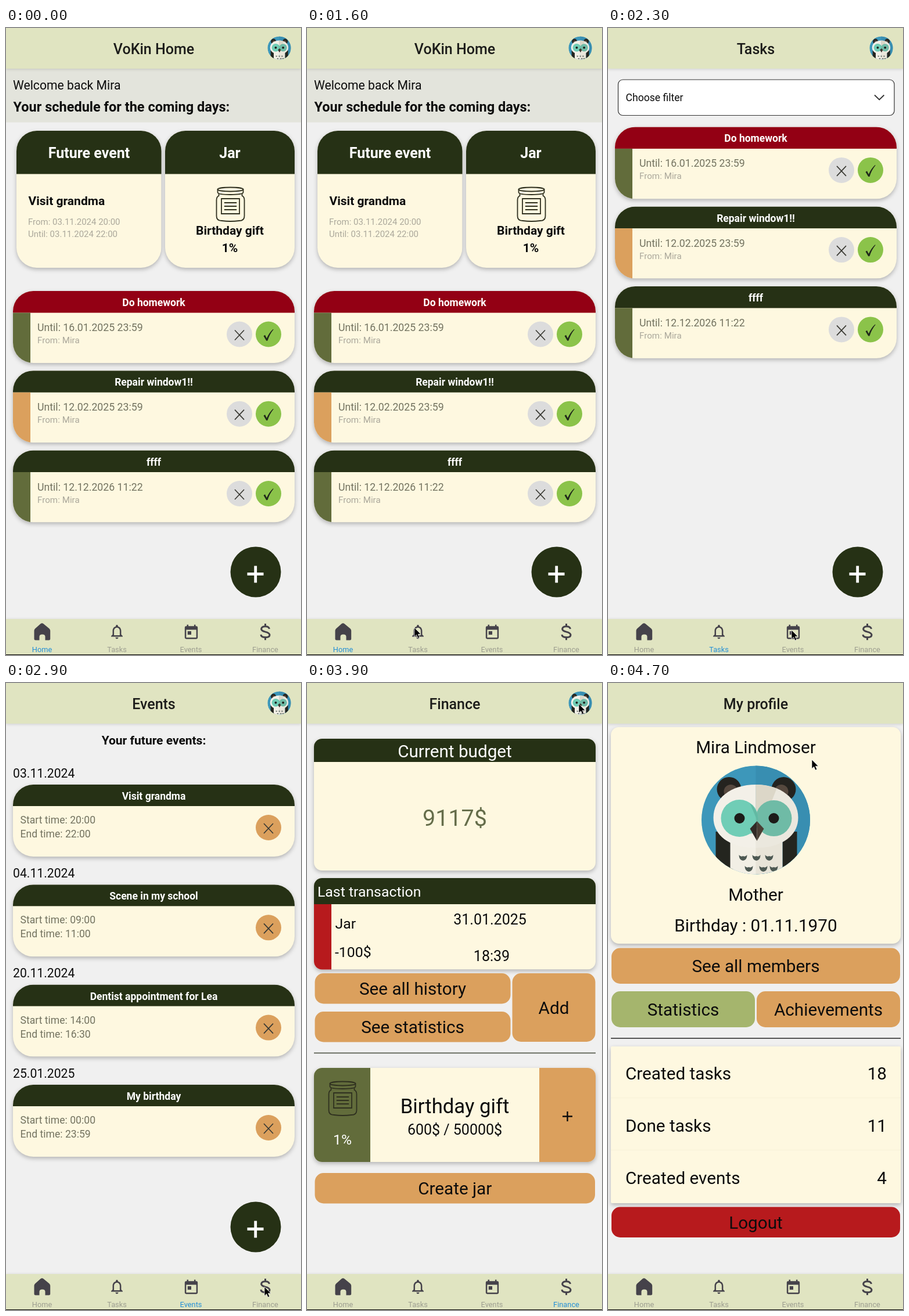
An HTML page that plays this animation: 508x1080 px, repeating every 5100 ms.

```html
<!DOCTYPE html>
<html lang="en">
<head>
<meta charset="utf-8">
<title>Family planner</title>
<style>
  html, body { margin: 0; width: 100%; height: 100%; overflow: hidden; background: #f0f0f0; }
  svg { display: block; width: 100vw; height: 100vh; }
  text { font-family: Roboto, Arial, sans-serif; white-space: pre; }
  .shadow { filter: drop-shadow(0 3px 3.5px rgba(0, 0, 0, .25)); }
  .soft { filter: drop-shadow(0 1px 2.5px rgba(0, 0, 0, .14)); }
</style>
</head>
<body>
<svg id="stage" viewBox="0 0 508 1080"></svg>
<script>
const C = {
  bar: '#e0e4c1', page: '#f0f0f0', dark: '#263115', cream: '#fef8e0', red: '#930014',
  olive: '#626c3b', orange: '#dba05d', green: '#8bc34a', grey: '#dcdcdc', moss: '#a5b56d',
  alert: '#b71a1d', body: '#737360', faint: '#aba89b', icon: '#45424a', blue: '#2490d6', ink: '#0c0c0c'
};
const USER = 'Mira', FULL_NAME = 'Mira Lindmoser';
let clipCount = 0;

const rect = (x, y, w, h, fill, r = 0, extra = '') =>
  `<rect x="${x}" y="${y}" width="${w}" height="${h}" rx="${r}" fill="${fill}" ${extra}/>`;
const circle = (x, y, r, fill) => `<circle cx="${x}" cy="${y}" r="${r}" fill="${fill}"/>`;
const line = (d, color, width) => `<path d="${d}" fill="none" stroke="${color}" stroke-width="${width}"/>`;
const shape = (d, fill) => `<path d="${d}" fill="${fill}"/>`;
const at = (x, y, inner, scale = 1) => `<g transform="translate(${x} ${y}) scale(${scale})">${inner}</g>`;
const text = (s, x, y, size, { fill = C.ink, weight = 400, anchor = 'start' } = {}) =>
  `<text x="${x}" y="${y}" font-size="${size}" fill="${fill}" font-weight="${weight}" text-anchor="${anchor}">${s}</text>`;
const mid = (s, x, y, size, fill = C.ink, weight = 400) => text(s, x, y, size, { fill, weight, anchor: 'middle' });

// Rounded, shadowed card; inner shapes use coordinates local to the card.
function card(x, y, w, h, r, inner) {
  const id = 'clip' + clipCount++;
  return at(x, y, `<clipPath id="${id}">${rect(0, 0, w, h, '#000', r)}</clipPath>
    <g class="shadow"><g clip-path="url(#${id})">${rect(0, 0, w, h, C.cream)}${inner}</g></g>`);
}

function button(label, x, y, w, h, fill = C.orange) {
  return rect(x, y, w, h, fill, 15) + mid(label, x + w / 2, y + h / 2 + 11, 29.7);
}

const cross = (x, y) => line(`M${x - 8} ${y - 7}l16 17m0-17l-16 17`, '#3a3a34', 1.7);
const check = (x, y) =>
  shape(`M${x - 8.5} ${y + 3}l2.6-1.7 2.800 5.700q4.500-10 11-15.800l.8.500q-7 8.500-10.200 19.300l-2.200.2z`, '#20281a');

const jar = (x, y) => at(x, y, `<g fill="none" stroke="#2f301f" stroke-width="1.8" stroke-linecap="round">
  <ellipse cy="4" rx="22" ry="3.500"/><path d="M-22 4v5q0 4 22 4t22-4V4"/>
  <path d="M-20 12v3q-4 2-4 7v28q0 8 9 8 15 2 30 0 9 0 9-8V22q0-5-4-7v-3"/>
  <path d="M-15.500 20h31v26h-31zM-10 27h20m-20 6h20m-20 6h20"/></g>`);

function owl(x, y, scale) {
  const id = 'clip' + clipCount++;
  const chevron = (cx, cy) => shape(`M${cx - 7} ${cy - 5}q3 4 7 2 4 2 7-2 0 9-7 10-7-1-7-10z`, '#4d5953');
  return at(x, y, `<clipPath id="${id}">${circle(0, 0, 93.5, '#000')}</clipPath><g clip-path="url(#${id})">
    ${circle(0, 0, 94, '#3d97ba')}${rect(0, -94, 94, 188, '#388eb1')}
    ${shape('M-69 20h30v80h-30zM46 20h25v80h-25z', '#24251f')}
    ${shape('M-44 30h45v70h-45z', '#f2efe5')}${shape('M0 30h46v70H0z', '#e8e4d8')}
    ${circle(-46, -53, 21, '#24231f')}${circle(48, -53, 21, '#24231f')}
    ${circle(-43, -49, 12, '#55483e')}${circle(44, -49, 12, '#55483e')}
    ${shape('M0-61C-43-61-73-37-73-4-73 28-43 48 0 48z', '#f3f0e8')}
    ${shape('M0-61C43-61 73-37 73-4 73 28 43 48 0 48z', '#ebe8de')}
    ${shape('M0-61Q20-61 36-54L28-34 2 0H0z', '#dcd7c8')}
    ${circle(-28, -3, 32, '#70cdb6')}${circle(31, -3, 31, '#6fbba6')}
    ${shape('M-10-29Q4-16 4-2q0 16-14 26Q7 19 2 0z', '#62b9a3')}
    ${circle(-28, -3, 9, '#1c1b18')}${circle(31, -3, 9, '#1c1b18')}
    ${shape('M2 2L-10 15 2 36z', '#312a25')}${shape('M2 2L14 15 2 36z', '#4a3e34')}
    ${[[-22, 65], [1, 65], [23, 65], [-12, 84], [13, 84], [31, 84]].map(p => chevron(...p)).join('')}
  </g>`, scale);
}

function header(title, avatar = true) {
  return `<g class="soft">${rect(0, 0, 508, 70, C.bar)}</g>` +
    mid(title, 254.5, 44.5, 25, '#1c1c1a', 500) + (avatar ? owl(470.5, 34.5, .215) : '');
}

function taskCard(y, title, due, strip = C.olive, head = C.dark) {
  return card(12, y, 485, 124, 35,
    rect(0, 0, 485, 37.5, head) + rect(0, 37.5, 30, 87, strip) +
    mid(title, 242.5, 26, 17.5, '#fff', 700) +
    text('Until: ' + due, 42, 69, 17.7, { fill: C.body }) +
    text('From: ' + USER, 42, 90, 15.2, { fill: C.faint }) +
    circle(390, 74.5, 22, C.grey) + cross(390, 74.5) +
    circle(440, 74.5, 22, C.green) + check(440, 74.5));
}

const taskList = y =>
  taskCard(y, 'Do homework', '16.01.2025 23:59', C.olive, C.red) +
  taskCard(y + 137.2, 'Repair window1!!', '12.02.2025 23:59', C.orange) +
  taskCard(y + 274.5, 'ffff', '12.12.2026 11:22');

function eventCard(y, date, title, start, end) {
  return text(date, 12, y - 12.5, 21.2) + card(12, y, 485, 124, 35,
    rect(0, 0, 485, 37, C.dark) + mid(title, 242.5, 26, 17.5, '#fff', 700) +
    text('Start time: ' + start, 12.5, 67, 17.6, { fill: C.body }) +
    text('End time: ' + end, 12.5, 91, 17.6, { fill: C.body }) +
    circle(440, 74, 22, C.orange) + cross(440, 74));
}

const addButton = circle(430, 937, 43.5, C.dark) + line('M415.5 940.5h28M429.7 926.5v29', '#fff', 4.8);

function home() {
  return rect(0, 70, 508, 92.5, '#e3e4dc') + header('VoKin Home') +
    text('Welcome back ' + USER, 12, 106, 21.2) +
    text('Your schedule for the coming days:', 12.5, 143.5, 23.5, { weight: 700 }) +
    card(18, 177, 249.5, 236, 35,
      rect(0, 0, 250, 74.5, C.dark) + mid('Future event', 125, 46.5, 25, '#fff', 700) +
      text('Visit grandma', 20.5, 127.5, 21, { weight: 700 }) +
      text('From: 03.11.2024 20:00', 20, 162, 15, { fill: C.faint }) +
      text('Until: 03.11.2024 22:00', 20, 182.5, 15, { fill: C.faint })) +
    card(274, 177, 223, 236, 35,
      rect(0, 0, 223, 74.5, C.dark) + mid('Jar', 111.5, 46.5, 25, '#fff', 700) +
      jar(112.5, 97) + mid('Birthday gift', 111.5, 179, 21, C.ink, 700) +
      mid('1%', 111.5, 208.5, 21, C.ink, 700)) +
    taskList(453) + addButton;
}

function tasks() {
  return header('Tasks') +
    rect(17.5, 89, 475.5, 61.5, '#fff', 8, 'stroke="#333" stroke-width="1.2"') +
    text('Choose filter', 30.5, 126, 17.6) +
    line('M459 115.5l8.2 8 8.2-8', '#333', 1.8) + taskList(170.4) + addButton;
}

function events() {
  return header('Events') + mid('Your future events:', 254.5, 106, 21, C.ink, 700) +
    eventCard(175, '03.11.2024', 'Visit grandma', '20:00', '22:00') +
    eventCard(347.3, '04.11.2024', 'Scene in my school', '09:00', '11:00') +
    eventCard(519.6, '20.11.2024', 'Dentist appointment for Lea', '14:00', '16:30') +
    eventCard(692, '25.01.2025', 'My birthday', '00:00', '23:59') + addButton;
}

function finance() {
  return header('Finance') +
    card(12, 96, 485, 227, 14,
      rect(0, 0, 485, 40, C.dark) + mid('Current budget', 242.5, 31.5, 29.7, '#fff') +
      mid('9117$', 242.5, 150, 39.5, '#656d4a')) +
    card(12, 336, 485, 157.5, 14,
      rect(0, 0, 485, 45, C.dark) + text('Last transaction', 6, 32, 24.8, { fill: '#fff' }) +
      rect(0, 45, 30, 113, C.alert) + text('Jar', 36.5, 87, 24.8) + text('-100$', 36, 136, 24.8) +
      mid('31.01.2025', 303, 80, 25) + mid('18:39', 306, 143, 25)) +
    button('See all history', 13.5, 500, 337, 52.5) + button('See statistics', 13.5, 566, 337, 52.5) +
    button('Add', 353.5, 500, 143, 118) +
    line('M12 637.3h485', '#595e50', 1.8) +
    card(12, 663, 485, 162, 14,
      rect(0, 0, 97, 162, C.olive) + rect(388, 0, 97, 162, C.orange) + jar(49.5, 23) +
      mid('1%', 49, 132, 24.7, '#fff') + mid('Birthday gift', 242.5, 78, 34.7) +
      mid('600$ / 50000$', 242.5, 114.5, 25) + line('M428 83.5h17M436.5 75v17', C.ink, 2.4)) +
    button('Create jar', 13.5, 844, 482.5, 52.5);
}

function profile() {
  const rows = [['Created tasks', 18], ['Done tasks', 11], ['Created events', 4]];
  return header('My profile', false) +
    card(5, 76, 499, 373, 14,
      mid(FULL_NAME, 249.5, 45, 29.7) + owl(249.5, 160, 1) +
      mid('Mother', 249.5, 298.5, 29.7) + mid('Birthday : 01.11.1970', 249.5, 352, 29.7)) +
    button('See all members', 6, 456.5, 497, 61.5) +
    button('Statistics', 6, 531, 247, 62, C.moss) + button('Achievements', 256, 531, 247, 62) +
    line('M5 612h499', '#222', 1.5) +
    card(5, 626, 499, 270, 2, rows.map(([label, count], i) =>
      text(label, 25, 57 + 90 * i, 29.7) + text(count, 475, 57 + 90 * i, 29.7, { anchor: 'end' }) +
      (i ? line(`M0 ${90 * i - 1.5}h499`, '#f8f2d9', 1.5) : '')).join('')) +
    button('Logout', 6, 902.5, 497, 52.5, C.alert);
}

const tabs = [['Home', 62], ['Tasks', 191], ['Events', 318.5], ['Finance', 446.5]];
const bell = 'M12 22c1.1 0 2-.9 2-2h-4c0 1.1.9 2 2 2zm6-6v-5c0-3.07-1.63-5.64-4.5-6.32V4c0-.83-.67-1.5-1.5-1.5s-1.5.67-1.5 1.5v.68C7.64 5.36 6 7.92 6 11v5l-2 2v1h16v-1zm-2 1H8v-6c0-2.48 1.51-4.5 4-4.5s4 2.02 4 4.5z';
const calendar = 'M19 3h-1V1h-2v2H8V1H6v2H5q-2 0-2 2v14q0 2 2 2h14q2 0 2-2V5q0-2-2-2zm0 16H5V8h14zM7 10h5v5H7z';
const dollar = 'M16 8.8Q15.6 6 11.6 6T7.2 8.8Q7.2 11 11.6 12T16.4 15.2Q16.4 18 11.7 18T6.8 15M11.6 3V6.5M11.6 17.5V21';

const nav = `<g class="soft">${rect(0, 1018, 508, 62, C.bar)}</g>` +
  shape('M59.5 1026.3q2.5-2 5 0l10 8.2q1.7 1.5 1.7 3.5v14q0 2.5-2.5 2.5h-6.2v-6q0-4-5-4t-5 4v6h-6.5q-2.5 0-2.5-2.5v-14q0-2 1.7-3.5z', C.icon) +
  at(176.1, 1025, shape(bell, C.icon), 1.24) +
  at(304.1, 1026.5, `<path d="${calendar}" fill="${C.icon}" fill-rule="evenodd"/>`, 1.24) +
  at(428.3, 1021.3, line(dollar, C.icon, 1.9), 1.57) +
  tabs.map(([label, x]) => `<g class="tab">${mid(label, x, 1075, 12.8, 'inherit')}</g>`).join('');

const pointer = `<path d="M0 0v15.5l3.6-3.3 2.5 5.8 2.7-1.2-2.5-5.6h4.8z" fill="#000" stroke="#fff" stroke-width=".7"/>`;

const stage = document.getElementById('stage');
stage.innerHTML = rect(0, 0, 508, 1080, C.page) +
  [home, tasks, events, finance, profile].map(draw => `<g class="screen">${draw()}</g>`).join('') +
  nav + `<g id="pointer">${pointer}</g>` + rect(0, 1079, 508, 1, '#000');

const screens = [...stage.querySelectorAll('.screen')];
const labels = [...stage.querySelectorAll('.tab text')];
const cursor = document.getElementById('pointer');

const LOOP = 5100, STEP = 100;
const switches = [0, 1700, 2400, 3000, 4000];
// Time, x and y of the pointer tip.
const route = [
  [400, 150, 1085], [1000, 185, 1033], [1700, 185, 1033], [2200, 316, 1037], [2400, 316, 1037],
  [2800, 445, 1040], [2900, 445, 1040], [3000, 440, 1001], [3500, 464, 18], [3700, 468, 36],
  [4000, 468, 36], [4600, 351, 132], [LOOP, 351, 132]
];

function pointerAt(t) {
  const i = route.findIndex(p => p[0] > t);
  const [t0, x0, y0] = route[i - 1], [t1, x1, y1] = route[i];
  const k = (t - t0) / (t1 - t0), e = k * (2 - k);
  return [x0 + (x1 - x0) * e, y0 + (y1 - y0) * e];
}

function render(now) {
  const t = Math.floor(now % LOOP / STEP) * STEP;
  const active = switches.filter(s => s <= t).length - 1;
  screens.forEach((s, i) => s.style.display = i === active ? '' : 'none');
  labels.forEach((l, i) => l.setAttribute('fill', i === active ? C.blue : '#9d9e90'));
  const visible = t >= route[0][0];
  cursor.style.display = visible ? '' : 'none';
  if (visible) cursor.setAttribute('transform', `translate(${pointerAt(t)})`);
}

const begin = performance.now();
function tick() {
  render(performance.now() - begin);
  requestAnimationFrame(tick);
}
tick();
</script>
</body>
</html>
```
